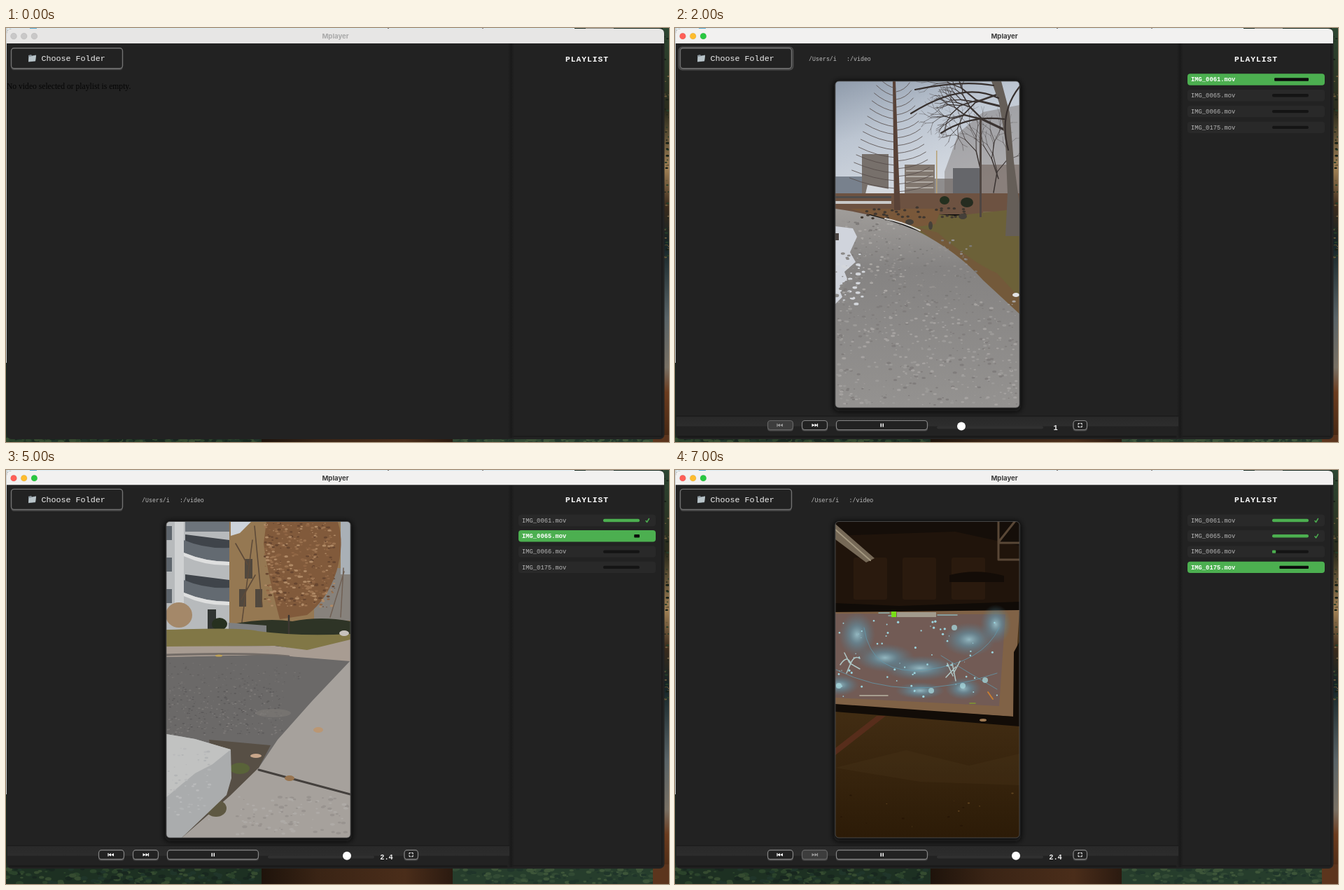
An HTML page that plays this animation: 947x591 px, repeating every 8000 ms.

```html
<!DOCTYPE html>
<html lang="en">
<head>
<meta charset="utf-8">
<title>Mplayer</title>
<style>
html, body { margin: 0; width: 100%; height: 100%; overflow: hidden; background: #222; }
svg { display: block; width: 100vw; height: 100vh; }
text { font-family: Inter, "Liberation Sans", sans-serif; white-space: pre; }
.mono { font-family: "Liberation Mono", monospace; }
.bold { font-weight: 700; }
.mid { text-anchor: middle; }
</style>
</head>
<body>
<svg viewBox="0 0 947 591">
  <defs>
    <linearGradient id="sky" x2=".5" y2="1"><stop stop-color="#8f9bab"/><stop offset=".4" stop-color="#bcc5d1"/><stop offset="1" stop-color="#dde1e7"/></linearGradient>
    <linearGradient id="path" x2="0" y2="1"><stop stop-color="#a09d9a"/><stop offset=".3" stop-color="#858382"/><stop offset="1" stop-color="#949290"/></linearGradient>
    <linearGradient id="lawn" x2="0" y2="1"><stop stop-color="#8b8153"/><stop offset=".5" stop-color="#8a7d50"/><stop offset="1" stop-color="#9b8457"/></linearGradient>
    <linearGradient id="fade" x2="0" y2="1"><stop stop-opacity="0"/><stop offset=".75" stop-opacity=".92"/><stop offset="1"/></linearGradient>
    <linearGradient id="floor" x2="0" y2="1"><stop stop-color="#3a2915"/><stop offset=".5" stop-color="#473116"/><stop offset="1" stop-color="#2c1b07"/></linearGradient>
    <linearGradient id="bar" x2="0" y2="1"><stop stop-color="#292929"/><stop offset="1" stop-color="#2d2d2d"/></linearGradient>
    <linearGradient id="seam"><stop stop-opacity="0"/><stop offset=".5" stop-opacity=".25"/><stop offset="1" stop-opacity="0"/></linearGradient>
    <linearGradient id="bark"><stop stop-color="#1e130b"/><stop offset=".3" stop-color="#3a2415"/><stop offset=".75" stop-color="#4a2d1a"/><stop offset="1" stop-color="#2b1a10"/></linearGradient>
    <linearGradient id="edge" x2="0" y2="1">
      <stop stop-color="#2d4632"/><stop offset=".2" stop-color="#2b2b1c"/><stop offset=".34" stop-color="#a08055"/>
      <stop offset=".43" stop-color="#3b2b1c"/><stop offset=".52" stop-color="#142325"/><stop offset=".7" stop-color="#596367"/>
      <stop offset=".82" stop-color="#787064"/><stop offset=".88" stop-color="#6b3c1f"/><stop offset="1" stop-color="#432612"/>
    </linearGradient>
    <radialGradient id="glow"><stop stop-color="#9fd6e4"/><stop offset=".4" stop-color="#5e9fb8" stop-opacity=".7"/><stop offset="1" stop-color="#4a8199" stop-opacity="0"/></radialGradient>
    <filter id="blur" x="-20%" y="-20%" width="140%" height="140%"><feGaussianBlur stdDeviation="4"/></filter>
  </defs>
  <g id="stage"></g>
</svg>
<script>
const rect = (x, y, w, h, fill, r = 0, more = '') =>
  `<rect x="${x}" y="${y}" width="${w}" height="${h}" fill="${fill}" rx="${r}" ${more}/>`;
const poly = (points, fill, more = '') => `<polygon points="${points}" fill="${fill}" ${more}/>`;
const path = (d, fill, more = '') => `<path d="${d}" fill="${fill}" ${more}/>`;
const line = (d, color, width = 1) =>
  path(d, 'none', `stroke="${color}" stroke-width="${width}" stroke-linecap="round" stroke-linejoin="round"`);
const oval = (x, y, rx, ry, fill, more = '') =>
  `<ellipse cx="${x}" cy="${y}" rx="${rx}" ry="${ry}" fill="${fill}" ${more}/>`;
const text = (x, y, size, fill, str, cls = '', more = '') =>
  `<text x="${x}" y="${y}" font-size="${size}" fill="${fill}" class="${cls}" ${more}>${str}</text>`;
const border = (color, width = 1) => `stroke="${color}" stroke-width="${width}"`;

function random(seed) {
  return () => (seed = (seed * 16807) % 2147483647) / 2147483647;
}

function speckle(x, y, w, h, count, colors, size, seed) {
  const rnd = random(seed);
  let out = '';
  for (let i = 0; i < count; i++) {
    const r = size * (.4 + rnd());
    out += oval((x + rnd() * w).toFixed(1), (y + rnd() * h).toFixed(1),
      r.toFixed(1), (r * .55).toFixed(1), colors[i % colors.length]);
  }
  return out;
}

function branch(x, y, angle, length, width, rnd) {
  if (length < 7) return '';
  const x2 = x + Math.cos(angle) * length, y2 = y + Math.sin(angle) * length;
  let out = line(`M${x.toFixed(1)} ${y.toFixed(1)}L${x2.toFixed(1)} ${y2.toFixed(1)}`, '#3b3432', width);
  for (const side of [-1, 1])
    out += branch(x2, y2, angle + side * (.2 + rnd() * .45), length * (.65 + rnd() * .2), width * .68, rnd);
  return out;
}

function parkPath() {
  const rnd = random(42);
  let trees = '';
  for (let i = 0; i < 14; i++) {
    const y = 86 + i * 11, reach = 24 + i * 3.2;
    trees += line(`M315 ${y}q${-reach / 2} -2 ${-reach} -15M316 ${y + 5}q${reach / 2} -2 ${reach * .8} -13`, '#554b48', .8);
  }
  trees += branch(470, 145, -2.7, 34, 3.5, rnd) + branch(466, 112, -2.9, 36, 3, rnd) +
    branch(460, 95, 2.8, 32, 2.5, rnd) + branch(437, 205, -1.8, 30, 1.5, rnd) +
    branch(462, 215, -1.9, 30, 1.5, rnd) + branch(455, 235, -1.4, 30, 1.5, rnd);
  let geese = '';
  for (let i = 0; i < 36; i++)
    geese += oval(262 + rnd() * 155, 256 + rnd() * 18, 2.3, 1.6, '#3f3730');
  return rect(229, 76, 263, 180, 'url(#sky)') +
    rect(267, 180, 38, 58, '#77706b') + rect(328, 195, 43, 45, '#81776f') +
    [203, 211, 219, 227].map(y => rect(330, y, 39, 2, '#b0aaa4')).join('') +
    rect(229, 212, 38, 28, '#78818d') + rect(371, 215, 26, 24, '#8f8d8d') + rect(397, 200, 38, 38, '#606873') +
    poly('385,205 405,150 440,120 492,110 492,240 385,240', '#6d625d', 'opacity=".4"') +
    rect(435, 195, 57, 45, '#6b5a50', 0, 'opacity=".55"') +
    rect(373, 175, 1.5, 62, '#b8a276') + poly('275,224 312,231 312,238 272,237', '#d5d9de') +
    rect(229, 236, 263, 30, '#6d5241') + rect(229, 240, 80, 3, '#4e4c4a') +
    rect(229, 247, 80, 4, '#c9c9c9') + rect(440, 262, 52, 4, '#77684a') +
    poly('280,262 330,262 400,268 492,258 492,408 440,360 340,284', '#6c6138') +
    poly('250,258 380,258 372,280 345,284 300,272', '#79583a') +
    path('M345 284L375 292Q425 335 460 350L492 385V410L430 352Z', '#73593a') +
    path('M229 258Q290 266 345 289Q405 320 440 360L492 408V542H229Z', 'url(#path)') +
    speckle(240, 275, 90, 110, 160, ['#aaa7a4', '#7e7b79', '#989593'], 2, 8) +
    speckle(300, 300, 130, 100, 140, ['#94918f', '#7c7a78'], 1.8, 10) +
    speckle(232, 390, 256, 148, 520, ['#a5a2a0', '#807d7c', '#9c9a98'], 2.2, 12) +
    path('M229 283l25 3 6 12-10 22 8 14-16 14 4 10-12 14 5 12-10 10Z', '#d0d4dc') +
    speckle(230, 320, 40, 75, 50, ['#d4d7dc', '#8b8987'], 3, 14) +
    poly('311,76 315,76 319,190 322,260 313,260', '#594237') + trees +
    rect(435, 130, 3, 140, '#4f4642') +
    path('M452 76h14l12 45 6 70 8 60v46h-20l3-60-3-75-9-55Z', '#655e58') +
    line('M492 84q-30 38-16 90M470 130q-50-6-90 20M462 100q-50-25-125 22M455 82q-45-8-112 6', '#37302e', 2.2) +
    geese + oval(335, 277, 6, 4, '#45403a') + oval(365, 282, 3, 6, '#45403a') + oval(411, 269, 6, 4, '#45403a') +
    oval(385, 246, 7, 6, '#24301f') + oval(417, 249, 9, 7, '#252c20') +
    line('M300 272Q325 277 350 289', '#d5d3d0', 2) + oval(487, 381, 5, 3, '#e2e3e5') +
    rect(229, 293, 5, 10, '#49423f');
}

function street() {
  return rect(229, 74, 263, 155, '#957852') + rect(440, 140, 52, 75, '#87827c') +
    rect(478, 74, 14, 75, '#a9b0b6') +
    rect(229, 74, 90, 155, '#b7babc') + rect(241, 74, 13, 150, '#cfd1d2') +
    [80, 125, 170].map(y => rect(229, y, 8, 20, '#5e656c')).join('') +
    rect(256, 74, 63, 14, '#6d747b') +
    [92, 149].map(y => poly(`256,${y} 319,${y + 8} 319,${y + 38} 290,${y + 35} 256,${y + 24}`, '#3f444a') +
      path(`M254 ${y + 8}Q285 ${y + 21} 319 ${y + 19}v20Q285 ${y + 39} 254 ${y + 26}Z`, '#636a71') +
      path(`M254 ${y + 26}Q285 ${y + 39} 319 ${y + 39}v5Q285 ${y + 45} 254 ${y + 31}Z`, '#dedfdf')).join('') +
    rect(288, 199, 12, 29, '#303432') +
    poly('321,74 350,74 334,90 321,94', '#cdd3da') + rect(341, 127, 11, 28, '#51483e') +
    rect(333, 170, 10, 25, '#51483e') + rect(356, 170, 10, 26, '#51483e') +
    line('M336 225L352 100M336 185l20-35M355 80l11 115M345 135l-17-30', '#5d4a39', 1.6) +
    path('M372 74H474Q484 105 472 145Q459 185 430 207L391 213Q374 150 368 105Z', '#815a3b') +
    speckle(370, 76, 100, 120, 420, ['#9c7350', '#674630', '#8f6544', '#b08a66'], 2.2, 21) +
    line('M463 210l20-65M478 210l4-70', '#706054', 1.5) +
    oval(247, 207, 19, 18, '#a48869') + oval(305, 220, 11, 9, '#26301f') +
    path('M318 221Q370 210 409 216Q450 208 492 216V239H318Z', '#2e3426') +
    poly('318,218 372,222 372,233 318,233', '#7e7f80') + line('M404 208v38', '#3c3732', 2.5) +
    path('M229 228Q340 224 360 230Q420 238 492 234V244L428 258L385 251L229 253Z', '#817746') +
    path('M229 252L384 251L430 257L492 242V274L441 270L380 264L229 268Z', '#a89c92') +
    line('M229 264Q350 260 404 266', '#746d68', 3) +
    path('M229 267L380 264L492 273L362 425L322 408L229 378Z', '#6b6968') +
    speckle(231, 275, 190, 35, 130, ['#777472', '#615f5e'], 1.2, 30) +
    speckle(231, 310, 165, 68, 400, ['#7d7a78', '#5d5b5b'], 1.3, 31) +
    oval(382, 347, 25, 6, '#7d7a77', 'opacity=".6"') +
    poly('492,272 492,526 229,526 300,460 361,425 388,385 437,330', '#a6a19c') +
    line('M361 428L492 463', '#44403d', 3) +
    speckle(330, 465, 158, 55, 110, ['#98938f', '#aeaaa6'], 2.6, 33) +
    poly('290,385 378,393 361,425 320,465 250,526 300,440', '#574f45') +
    oval(334, 426, 14, 8, '#596339') + oval(300, 483, 15, 12, '#5e5842') +
    path('M229 377L270 384L321 399L322 440L315 464L250 526H229Z', '#aaacad') +
    path('M229 377L270 384L321 399L295 420L270 433L229 467Z', '#c1c2c1') +
    speckle(231, 395, 60, 105, 60, ['#b9babb', '#b2b4b5'], 2, 36) +
    oval(446, 371, 7, 4, '#ba9774') + oval(405, 440, 7, 4, '#98744f') + oval(357, 408, 8, 3, '#c8a68a') +
    oval(304, 265, 5, 1.5, '#c1a457') + oval(483, 233, 7, 4, '#c7c2bd');
}

function squirrelLawn() {
  return rect(229, 74, 263, 452, 'url(#lawn)') +
    speckle(229, 130, 263, 140, 300, ['#989060', '#81784a'], 2.2, 41) +
    speckle(229, 315, 263, 180, 520, ['#a28d5f', '#7b7047', '#9c8654'], 2.3, 44) +
    rect(300, 74, 192, 34, '#b9b5b0') + [82, 91, 100].map(y => rect(300, y, 192, 1, '#96928e')).join('') +
    [350, 395, 440, 478].map((x, i) => oval(x, 100, 18, 14, i % 2 ? '#857151' : '#948160')).join('') +
    path('M229 112Q350 103 492 109V120Q430 126 390 122L300 128L229 122Z', '#343235') +
    rect(473, 90, 3, 22, '#242224') +
    path('M229 212Q310 209 365 221Q414 230 408 247Q400 277 350 292Q300 303 270 315L229 326Z', '#343136') +
    speckle(235, 222, 145, 75, 60, ['#49434a', '#292629'], 2, 51) +
    path('M229 204l10 7 11 25-21 10Z', '#594c3d') + line('M230 74V208', '#55432c', 3) +
    speckle(230, 76, 105, 72, 80, ['#a86633', '#86502c', '#be7f4d'], 7, 55) +
    speckle(231, 115, 42, 48, 22, ['#a8652f', '#c48a57'], 6, 57) +
    line('M286 258L281 213M295 255L298 213M287 260L245 262M294 264L325 251M237 250Q270 300 350 287M330 265L380 259', '#9d8870', 1.5) +
    poly('268,258 291,253 300,270 280,268', '#c5ad91') +
    path('M333 253L337 233L335 224L339 222L345 223L348 233L364 240L369 254Z', '#151519') +
    oval(375, 236, 19, 11, '#28252b') + oval(482, 234, 8, 4, '#b39670') + line('M363 403L391 380', '#c3ad78', 1.5) +
    speckle(240, 360, 240, 100, 18, ['#b28455', '#745332'], 4, 61) +
    rect(229, 462, 263, 64, 'url(#fade)') +
    poly('244,486.5 252,491 244,495.5', '#fff') +
    text(264, 494.3, 10, '#fff', '0:03 / 0:35', '', 'style="font-family:Roboto,sans-serif"') +
    path('M398 489h3l4-4v12l-4-4h-3Z', '#fff') + line('M407 488q2 3 0 6M407 485.5q5 5.5 0 11', '#fff', 1.2) +
    line('M434.5 490v-3h3M440 487h3v3M443 492v3h-3M437.5 495h-3v-3', '#fff', 1.4) +
    [487, 491, 495].map(y => oval(474, y, 1.2, 1.2, '#fff')).join('') +
    rect(241, 508, 239, 2.5, '#bebebe', 1) + rect(241, 508, 21, 2.5, '#fff', 1);
}

function projection() {
  const glow = [[260, 235, 26, 32], [300, 268, 42, 20], [350, 283, 52, 18], [420, 242, 38, 24], [458, 220, 22, 28], [235, 307, 28, 15], [412, 312, 26, 16], [350, 315, 35, 12]];
  const rnd = random(77);
  let stars = '';
  for (let i = 0; i < 60; i++) {
    const r = .5 + rnd() * 1.2;
    stars += oval(233 + rnd() * 230, 214 + rnd() * 110, r, r, '#9cd5df');
  }
  return rect(229, 74, 263, 452, 'url(#floor)') + rect(229, 74, 263, 130, '#20140b') +
    poly('229,74 492,74 492,108 400,88 229,94', '#150e09') +
    [255, 325, 395].map(x => rect(x, 125, 48, 60, '#2a1a0e', 3)).join('') +
    path('M392 160V150Q430 140 470 151V160Z', '#130c07') +
    poly('229,77 285,126 273,132 229,99', '#766957') + line('M229 85L279 129', '#a49880', 2) +
    line('M462 74v54M462 104h30M462 128h30M485 74l-23 29', '#594736', 3) +
    path('M229 190L320 194L492 188V202H229Z', '#100b07') +
    poly('229,203 492,200 488,265 484,352 229,336', '#806246') +
    path('M229 334L483 352L484 260L492 245V366L229 345Z', '#120c07') +
    poly('229,205 472,206 463,337 229,325', '#725b55') +
    glow.map(([x, y, rx, ry]) => oval(x, y, rx, ry, 'url(#glow)', 'opacity=".75"')).join('') +
    line('M270 225Q280 295 360 285T463 225M230 285Q330 335 460 290M380 265q40 25 80 48', '#6299ab', .8) + stars +
    [[234, 308], [411, 308], [366, 315], [399, 225], [443, 300]].map(([x, y]) => oval(x, y, 4, 4, '#a7d8de', 'opacity=".75"')).join('') +
    line('M236 278q10-15 15-2q5-12 13-7M251 276l-6 14M250 276l14 8M249 275l-7-14M387 296l14-15M401 301l-5-25M389 276l8 18M407 273l-9 17', '#afc8c7', 1.5) +
    rect(317, 203, 56, 7, '#a29b8d') + rect(309, 202, 7, 8, '#78df16') +
    line('M291 204h15M305 208h4M375 207h28', '#8db4b5', 1.5) + line('M264 322h40', '#b9b5a4', 1.5) +
    line('M447 317l7 10', '#c77d32', 2) + line('M421 333h8', '#819b2e', 1.5) +
    poly('229,397 288,351 301,351 229,407', '#572d1b') + oval(440, 357, 5, 2, '#9d7852') +
    path('M229 425L330 400L420 422L492 405V450L350 445Z', '#4b351c', 'opacity=".3"') +
    speckle(235, 460, 250, 60, 14, ['#61451f', '#271606'], 1.5, 81);
}

const photos = [parkPath, street, squirrelLawn, projection].map(draw => draw());

function desktop(bottom) {
  const lightEnd = bottom > 580 ? 478 : 463;
  return rect(0, 0, 947, 591, '#172a20') + rect(0, 0, 812, 3, '#dcebf2') +
    rect(34, 0, 10, 2, '#55acd3') + rect(545, 0, 2, 2, '#777') + rect(680, 0, 2, 2, '#888') +
    rect(828, 0, 40, 3, '#888982') + rect(0, 0, 2, lightEnd, '#cfd4d5') +
    rect(938, 0, 9, 591, 'url(#edge)') +
    speckle(941, 10, 6, 320, 60, ['#6b5a3b', '#253c29', '#172017'], 2, 91) +
    rect(0, bottom - 8, 940, 600 - bottom, '#1d3022') +
    speckle(0, bottom, 360, 591 - bottom, 170, ['#2b432b', '#18271f', '#354b30', '#20352a'], 4, 93) +
    rect(638, bottom - 8, 290, 600 - bottom, '#263d2c') +
    speckle(640, bottom, 285, 591 - bottom, 130, ['#324a34', '#20352a', '#3d5539'], 4, 95) +
    rect(365, bottom - 8, 273, 600 - bottom, 'url(#bark)') +
    rect(924, bottom - 6, 23, 30, '#5c351d');
}

function mainWindow(s, bottom, top) {
  const lights = s.inactive ? ['#c9c8c8', '#c9c8c8', '#c9c8c8'] : ['#ff5f57', '#febc2e', '#28c840'];
  const focus = s.folderFocus ? rect(5.5, top - .5, 163, 32, 'none', 5, border('#4b4b4b', 2)) : '';
  return rect(1, 1, 939.5, bottom - 1, '#222', 7) +
    path(`M1 ${s.tall ? 22 : 21.3}V8Q1 1 8 1H933Q940 1 940 8V${s.tall ? 22 : 21.3}Z`, s.inactive ? '#e7e6e5' : '#f2f1f0') +
    lights.map((c, i) => oval(11 + i * 14.7, 11.7, 4.4, 4.4, c, border('#0002', .5))).join('') +
    text(470.5, 14.8, 9.6, s.inactive ? '#a9a9a9' : '#3c3c3c', 'Mplayer', 'bold mid') +
    rect(717, 22, 9, bottom - 24, 'url(#seam)') +
    line(`M724 ${bottom - 4}H937V24`, '#1c1c1c', 2) + focus +
    rect(7.5, top + 3, 159, 29, '#484848', 4) +
    rect(7.5, top + .7, 159, 29, '#222', 4, border('#727272', 1.4)) +
    path(`M32 ${top + 11}l4-1 1 1.5 6-1-1 9-10 1Z`, '#849097') + path(`M33 ${top + 13}l10-2-1 8-10 1Z`, '#b9c4c9') +
    text(50.5, top + 19.3, 11.7, '#eee', 'Choose Folder', 'mono') +
    text(799, top + 19.5, 11.4, '#fff', 'PLAYLIST', 'mono bold', 'letter-spacing=".92"');
}

function playlist(s) {
  return ['0061', '0065', '0066', '0175'].map((id, i) => {
    const active = i === s.clip, p = s.progress[i], y = s.tall ? 73.5 + 22.8 * i : 72 + 22.3 * i;
    return rect(732, y - 8.2, 196, 16.4, active ? '#4caf50' : '#292929', 4) +
      text(737, y + 2.7, 8.8, active ? '#fff' : '#b6b6b6', `IMG_${id}.mov`, active ? 'mono bold' : 'mono') +
      rect(853, y - 2.2, 52, 4.4, active ? '#4caf50' : '#141414', 2) +
      (active ? rect(853 + 52 * p, y - 2.2, 52 * (1 - p), 4.4, '#0c0c0c', 1)
        : p ? rect(853, y - 2.2, 52 * p, 4.4, '#4caf50', p < 1 ? 1 : 2) : '') +
      (p === 1 ? line(`M914 ${y + .5}l1.5 2 3-5`, '#4caf50', 1.5) : '');
  }).join('');
}

function controls(s, y) {
  const button = (x, w, disabled, focus) =>
    (focus ? rect(x - 1.5, y - 8, w + 3, 17, 'none', 4, border('#555', 1.5)) : '') +
    rect(x, y - 5, w, 13.5, '#484848', 4) +
    rect(x + .5, y - 6.5, w - 1, 13, disabled ? '#3d3d3d' : '#222', 4, border(disabled ? '#656565' : '#858585', 1.2));
  const skip = (x, dir, color) => path(`M${x} ${y - 2.3}v4.6l${4 * dir} -2.3ZM${x - 4 * dir} ${y - 2.3}v4.6l${4 * dir} -2.3Z`, color) +
    rect(x + 4 * dir - .6, y - 2.3, 1.2, 4.6, color);
  const knob = s.speed === 1 ? 409 : 487;
  return rect(2, y - 12.5, 717, 14, 'url(#bar)') + line(`M2 ${y - 13}H719`, '#191919', 1) +
    line(`M5 ${y + 16.5}H715`, '#1a1a1a', 3) +
    button(132, 37, s.clip === 0) + skip(150, -1, s.clip === 0 ? '#999' : '#fff') +
    button(181, 37, s.clip === 3) + skip(199.5, 1, s.clip === 3 ? '#999' : '#fff') +
    button(230, 131, false, s.paused) +
    (s.paused ? poly(`294,${y - 2.5} 298.5,${y} 294,${y + 2.5}`, '#fff')
      : rect(293.5, y - 2.5, 1.5, 5, '#fff') + rect(296.5, y - 2.5, 1.5, 5, '#fff')) +
    rect(374, y + 1.2, 152, 4, '#303030', 2) + oval(knob, y + 1.5, 6, 6, '#fff') +
    text(543.5, y + 7, 10.4, '#eee', s.speed, 'mono bold mid') +
    button(568.5, 20.5) +
    line(`M576 ${y - 1}v-1.6h1.7M579.5 ${y - 2.6}h1.7v1.6M581.2 ${y + 1}v1.6h-1.7M577.7 ${y + 2.6}h-1.7v-1.6`, '#fff', 1);
}

function player(s, bottom) {
  const y = s.tall ? 76 : 73.5, h = s.tall ? 466 : 451.5;
  const [px, py] = s.label;
  return text(px, py, 8.3, '#bbb', '/Users/i', 'mono') + text(px + 54, py, 8.3, '#bbb', ':/video', 'mono') +
    rect(227, y, 267, h + 5, '#0b0b0b', 7, 'filter="url(#blur)"') +
    `<clipPath id="frame">${rect(229, y, 263, h, '#000', 5)}</clipPath><g clip-path="url(#frame)">${photos[s.clip]}</g>` +
    rect(229, y, 263, h, 'none', 5, border('#555', .8)) +
    playlist(s) + controls(s, bottom - (s.tall ? 20 : 19.8)) +
    (s.tooltip ? rect(577, 569, 77, 13, '#dededc', 0, border('#aaa', .5)) + text(581, 578.5, 8, '#333', 'Toggle Fullscreen') : '');
}

function folderIcon(x, y) {
  return path(`M${x} ${y - 4}q0-1 1-1h3l1 1h5q1 0 1 1v7q0 1-1 1h-9q-1 0-1-1Z`, '#2ba3d8') +
    rect(x, y - 2.5, 11, 7.5, '#62c4ee', 1);
}

function dialog() {
  const names = ['Music', 'MyFiles', 'ntws', 'Pictures', 'Public', 'PyCharmMiscProject', 'PycharmProjects', 'video'];
  const rows = names.map((name, i) => {
    const y = 82.5 + i * 14.65, chosen = i === 7;
    return (i % 2 ? rect(310, y - 7.3, 439, 14.6, chosen ? '#0a63e0' : '#f4f4f4') : '') +
      folderIcon(329.5, y) + text(344, y + 3.3, 9.4, chosen ? '#fff' : '#252525', name);
  }).join('');
  const places = ['Nimvel Drive', 'Documents', 'Desktop', 'Shared'].map((name, i) =>
    text(192, 134.3 + i * 20.5, 9.4, '#303030', name)).join('');
  const heading = (y, name) => text(174, y, 8.5, '#858585', name, 'bold');
  const field = (x, y, w, h) => rect(x, y, w, h, '#fff', 4, border('#e2e2e2', .8));
  const chevron = (x, y) => line(`M${x - 2} ${y - 1}l2 2 2-2`, '#333', 1.3);
  const dots = [0, 1, 2, 3, 4, 5, 6, 7, 8].map(i =>
    rect(411.5 + i % 3 * 4, 23 + Math.floor(i / 3) * 3.4, 2.6, 2.2, 'none', 0, border('#444', .8))).join('');
  return path('M151 22H762V298Q762 323 737 323H176Q151 323 151 298Z', '#1d1d1d') +
    rect(151, 2, 611, 20, '#d2d2d2') +
    rect(163, 5, 586, 292, '#fff', 7, border('#777', .7)) +
    path('M310 5H170Q163 5 163 12V290Q163 297 170 297H310Z', '#cdcdcb') + rect(168, 6, 138, 40, '#d1d1d0') +
    line('M310 5V297', '#bdbdbd', .7) + heading(117, 'Nimvel') + heading(223, 'Locations') + heading(287.5, 'Tags') + places +
    line('M178 134.5q-3-1-1.5-4q1-1.5 3-1q2-4 5-1q1 2 1.5 2q2 3-1 4ZM178 147h4l3 3v6h-7ZM182 147v3h3M176 168h10v8h-10ZM176 170h10M178 175h6M176 188.5h4l1 1h5v7h-10ZM176 191.5h10', '#25a5b5', 1.1) +
    oval(184.5, 190, 1.8, 1.8, '#25a5b5') +
    line('M178 253.5h7l2 4v3h-11v-3ZM176 257.5h11', '#777', 1) + text(192, 260.3, 9.4, '#303030', 'Mplayer 0.0.0-arm...') +
    path('M286 257l3.5-4 3.5 4ZM286 258.5h7v1.2h-7Z', '#777') + oval(219, 71, .6, .6, '#999') +
    field(324, 19, 36, 16) + line('M342 19V35', '#e5e5e5', .8) +
    line('M334.5 23l-4 4 4 4M349 23l4 4-4 4', '#aaa', 1.1) +
    field(365, 19, 34, 16) + line('M375 23.5h7M375 27h7M375 30.5h7', '#444', 1.1) +
    line('M372.3 23.5h.1M372.3 27h.1M372.3 30.5h.1', '#444', 1.3) + chevron(391.5, 27) +
    field(405, 19, 33, 16) + dots + chevron(430.5, 27) +
    field(454, 19, 153, 16) + rect(490, 18, 45, 18, '#fff') + folderIcon(460, 27) +
    rect(592, 21, 12, 12, '#137ef5', 3) + line('M596 25.5l2-2 2 2M596 28.5l2 2 2-2', '#fff', 1.2) +
    field(622.5, 19, 112, 16) + rect(730, 18, 7, 18, '#fff') +
    oval(631.3, 26.3, 3, 3, 'none', border('#333', 1.1)) + line('M633.5 28.7l3 3', '#333', 1.2) +
    text(642, 30.5, 9.4, '#b0b0b0', 'Search') +
    line('M310 50.5H749M310 71.5H749M310 253.5H749', '#dedede', .8) + rect(326, 52, 47, 18, '#f7f7f7') +
    text(344, 63.2, 8.7, '#222', 'Folders', 'bold') + line('M715 62l2.5-2.5 2.5 2.5', '#777', .9) +
    line('M727 53V68', '#ddd', .8) + text(732, 63.2, 8.5, '#777', 'Size') + rect(330, 71, 10, 2, '#4bb9e8') + rows +
    text(344, 223.8, 8.5, '#777', 'Other', '', 'font-weight="600"') + rect(310, 231.5, 439, 14, '#f4f4f4') +
    path('M332 234h4l3 3v7h-7Z', '#e2e2e2') + text(344, 242, 9.4, '#b9b9b9', 'jcef_1245.log') +
    `<svg x="740" y="232" width="9" height="14">${text(6, 10, 9, '#999', '2')}</svg>` +
    rect(623, 268, 53, 15, '#fff', 4, border('#ddd', .8)) + text(649.5, 278.7, 9.4, '#222', 'Cancel', 'mid') +
    rect(682, 268, 53, 15, '#087cff', 4) + text(708.5, 278.7, 9.4, '#fff', 'Open', 'mid');
}

// One entry per second of the loop.
const states = [
  { inactive: true, tall: true },
  { inactive: true, tall: true, dialog: true },
  { tall: true, clip: 0, progress: [.06, 0, 0, 0], speed: 1, label: [191, 47], folderFocus: true },
  { tall: true, clip: 0, progress: [.55, 0, 0, 0], speed: 1, label: [191, 47] },
  { clip: 1, progress: [1, .6, 0, 0], speed: 1, label: [194, 45.5], tooltip: true },
  { clip: 1, progress: [1, .85, 0, 0], speed: 2.4, label: [194, 45.5] },
  { clip: 2, progress: [1, 1, .1, 0], speed: 2.4, label: [192, 48], paused: true },
  { clip: 3, progress: [1, 1, .1, .2], speed: 2.4, label: [194.5, 45.5] },
];

function render(s) {
  const bottom = s.tall ? 587 : 569, top = s.tall ? 28 : 26.7;
  return desktop(bottom) + mainWindow(s, bottom, top) +
    (s.progress ? player(s, bottom) : text(1, 86.5, 11.6, '#050505', 'No video selected or playlist is empty.', '', 'style="font-family:\'Liberation Serif\',serif"')) +
    (s.dialog ? dialog() : '');
}

const scenes = states.map(render);
const stage = document.getElementById('stage');
const start = performance.now();
let shown = -1;

function tick() {
  const index = Math.floor((performance.now() - start) / 1000) % scenes.length;
  if (index !== shown) stage.innerHTML = scenes[shown = index];
  requestAnimationFrame(tick);
}
tick();
</script>
</body>
</html>
```
